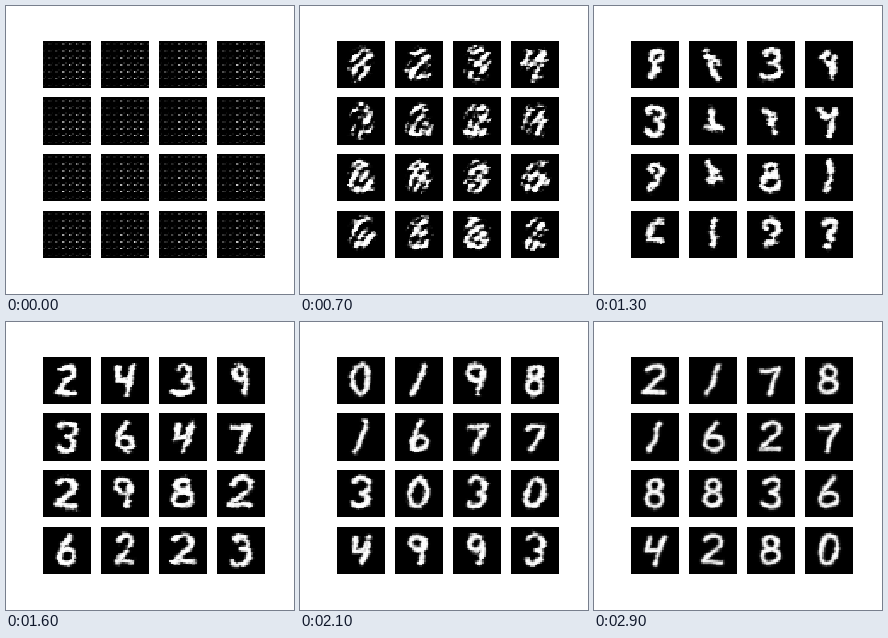
Animation of 288 by 288 pixels, one loop 3100 ms. Source, as a matplotlib script:

```python
import numpy as np
import matplotlib.pyplot as plt
from matplotlib.animation import FuncAnimation

SIZE, TILES, TICKS = 28, 16, 31
LAST = TICKS - 2  # the final picture is held for two ticks
STRIPES_END, DIGITS_START = 4, 10
YY, XX = np.mgrid[0:SIZE, 0:SIZE] + 0.5

# What the sixteen tiles resemble as training goes on
READINGS = {
    10: "8234" "3324" "8885" "5582",
    16: "2439" "3647" "2982" "6223",
    21: "0198" "1677" "3030" "4993",
    25: "8178" "1677" "8838" "4293",
    29: "2178" "1627" "8836" "4280",
}
KEYS = list(READINGS)


def arc(cx, cy, rx, ry, start, stop):
    a = np.radians(np.linspace(start, stop, 24))
    return np.column_stack([cx + rx * np.cos(a), cy + ry * np.sin(a)])


def path(*parts, count=36):
    """Join points and arcs into one pen stroke of evenly spaced points."""
    pts = np.vstack(parts)
    run = np.r_[0, np.cumsum(np.hypot(*np.diff(pts, axis=0).T))]
    at = np.linspace(0, run[-1], count)
    return np.column_stack([np.interp(at, run, pts[:, k]) for k in (0, 1)])


# One stroke per digit in a box from -1 to 1, y pointing down
GLYPHS = [
    path(arc(0, 0, 0.85, 1, -90, 270)),
    path((0.35, -1), (0.15, 0), (-0.45, 1)),
    path(arc(0, -0.5, 0.8, 0.5, -160, 60), (-0.9, 0.85), (0.95, 0.9)),
    path(arc(0, -0.5, 0.75, 0.5, -150, 90), arc(0, 0.5, 0.9, 0.5, -90, 150)),
    path((-0.7, -0.8), (-0.75, 0.05), (0.4, 0.05), (0.8, -0.9), (0.3, 1)),
    path((0.9, -1), (-0.4, -0.8), (-0.6, -0.1),
         arc(0, 0.4, 0.85, 0.55, -110, 150)),
    path((0.3, -1), (-0.4, -0.3), arc(0.1, 0.45, 0.85, 0.48, 200, -140)),
    path((-0.95, -0.6), (0.85, -0.75), (0.3, 0.1), (-0.05, 1)),
    path(arc(0, -0.5, 0.7, 0.45, 90, 450), arc(0, 0.45, 0.8, 0.5, -90, 270)),
    path(arc(-0.1, -0.45, 0.75, 0.5, -30, -390), (0.55, 0.2), (0.3, 1)),
]


def ease(u):
    u = np.clip(u, 0, 1)
    return u * u * (3 - 2 * u)


def tile_rng(tile):
    return np.random.default_rng(70 + tile)


def drift_noise(rng, tick):
    """Short horizontal smears that slowly turn into others."""
    a, b = rng.normal(size=(2, SIZE, SIZE))
    n = a * np.cos(0.45 * tick) + b * np.sin(0.45 * tick)
    n = sum(np.roll(n, s, 1) for s in range(-2, 3))
    n = n + np.roll(n, 1, 0)
    return n / n.std()


def stripe_field(rng):
    """Curved bands leaning right, confined to the middle of the tile."""
    phase = rng.uniform(0, 2 * np.pi)
    lean = np.radians(rng.normal(52, 5))
    x, y = XX - 14, YY - 14
    along = x * np.cos(lean) - y * np.sin(lean)
    across = x * np.sin(lean) + y * np.cos(lean) - 0.018 * along ** 2
    bands = 1.7 * np.cos(2 * np.pi * across / 4.9 + phase) - 0.3
    inside = 9.5 - np.hypot(1.1 * x, y)
    return np.minimum(bands, inside)


def pen_stroke(tick, tile, rng):
    """Stroke of the tile, bending from one digit into the next."""
    tick = max(tick, KEYS[0])
    k = min(np.searchsorted(KEYS, tick, side="right") - 1, len(KEYS) - 2)
    t0, t1 = KEYS[k], KEYS[k + 1]
    u = ease((tick - t0) / (t1 - t0))
    start, stop = (GLYPHS[int(READINGS[t][tile])] for t in (t0, t1))
    x, y = ((1 - u) * start + u * stop).T

    wobble = 1.3 - 0.9 * tick / LAST
    s = np.linspace(0, 3 * np.pi, len(x))
    p, q = rng.uniform(0, 2 * np.pi, 2)
    slant = rng.uniform(0.1, 1.2)
    px = 13.8 + 5.6 * x - slant * y + wobble * np.sin(s + p + 0.3 * tick)
    py = 13.8 + 8.2 * y + 0.6 * wobble * np.sin(s + q - 0.3 * tick)
    return px, py


def stroke_field(px, py, half):
    """Signed distance to a polyline, positive inside."""
    x0, y0 = px[:-1, None, None], py[:-1, None, None]
    dx, dy = np.diff(px)[:, None, None], np.diff(py)[:, None, None]
    along = ((XX - x0) * dx + (YY - y0) * dy) / (dx * dx + dy * dy + 1e-9)
    along = np.clip(along, 0, 1)
    gap = np.hypot(XX - x0 - along * dx, YY - y0 - along * dy)
    return half - gap.min(axis=0)


def dot_grid(rng):
    """Regular artefacts of strided upsampling, brighter to the lower right."""
    x, y = np.arange(SIZE), np.arange(SIZE)[:, None]
    level = np.where(x > 9, 0.75, 0.3) * (0.35 + 0.65 * y / 24)
    level = level * np.where((x > 24) | (y > 24), 0.3, 1)
    img = level * ((x % 4 == 3) & (y % 4 == 2))
    img = img + 0.45 * level * ((x % 4 == 0) & (y % 4 == 2))
    img = img + 0.25 * level * ((x % 4 == 1) & (y % 4 == 1))
    return np.clip(img * rng.uniform(0.6, 1.35, img.shape), 0, 1)


def tile_image(tick, tile):
    rng = tile_rng(tile)
    done = tick / LAST
    dots = dot_grid(rng)
    stripes = stripe_field(rng)
    px, py = pen_stroke(tick, tile, rng)
    digit = np.maximum(stroke_field(px, py, 1.75 - 0.45 * done), -4)

    u = ease((tick - STRIPES_END) / (DIGITS_START - STRIPES_END))
    field = (1 - u) * np.maximum(stripes, -4) + u * digit
    field = field + (0.75 - 0.5 * done) * drift_noise(rng, tick)
    img = 1 / (1 + np.exp(-field / (0.2 + 0.12 * done)))

    grown = ease(tick / 3)
    return grown * img + (1 - grown) * dots


fig, axes = plt.subplots(4, 4, figsize=(4, 4), dpi=72, facecolor="white")
fig.subplots_adjust(left=0.125, right=0.9, bottom=0.125, top=0.88,
                    wspace=0.2, hspace=0.2)
images = []
for ax in axes.flat:
    ax.axis("off")
    images.append(ax.imshow(np.zeros((SIZE, SIZE)), cmap="gray", vmin=0,
                            vmax=1, interpolation="nearest"))


def draw(i):
    for tile, im in enumerate(images):
        im.set_data(tile_image(min(i, LAST), tile))
    return images


anim = FuncAnimation(fig, draw, frames=TICKS, interval=100, repeat=True)
plt.show()
```
